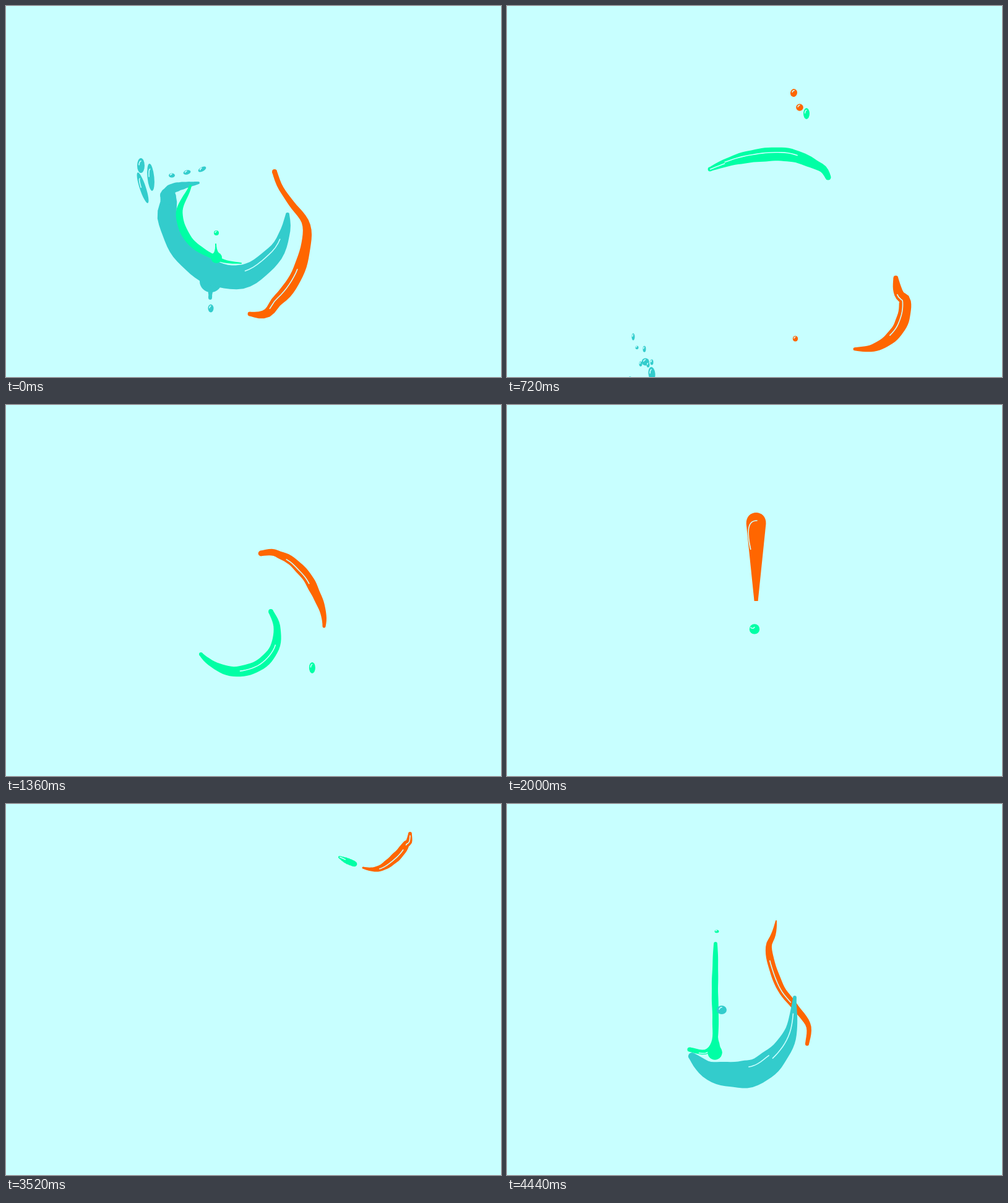
Animation of 800 by 600 pixels, one loop 4.48 s. Source, as an HTML page with a canvas:

```html
<!DOCTYPE html>
<html lang="en">
<head>
<meta charset="utf-8">
<title>Liquid exclamation</title>
<style>
html, body { margin: 0; width: 100%; height: 100%; overflow: hidden; background: #c8ffff; }
canvas { display: block; width: 800px; height: 600px; }
</style>
</head>
<body>
<canvas id="stage" width="800" height="600"></canvas>
<script>
const ctx = document.getElementById('stage').getContext('2d');
const PALE = '#c8ffff', TEAL = '#33cccc', GREEN = '#00ffa5', ORANGE = '#ff6600';
const LOOP = 4480, STEP = 80, GRAVITY = 0.001225, SAMPLES = 40, SUB = 16;
const lerp = (a, b, k) => a + (b - a) * k;
const inside = (t, from, to) => t >= from && t < to;
const easeIn = k => k ** 1.5;
const easeOut = k => 1 - (1 - k) ** 2;

let seed = 7;
const random = () => (seed = seed * 16807 % 2147483647) / 2147483647;

// Points along part of an ellipse, angles in degrees, clockwise.
function arc(cx, cy, rx, ry, from, to) {
  const n = Math.ceil((to - from) / 40);
  return Array.from({ length: n + 1 }, (_, i) => {
    const a = lerp(from, to, i / n) * Math.PI / 180;
    return [cx + rx * Math.cos(a), cy + ry * Math.sin(a)];
  });
}

// Smooth curve through all points, addressed by arc length.
function makeGuide(p) {
  const pick = i => p[Math.max(0, Math.min(p.length - 1, i))];
  const pts = [], len = [];
  for (let j = 0; j <= (p.length - 1) * SUB; j++) {
    const i = Math.floor(j / SUB), u = (j % SUB) / SUB;
    const a = pick(i - 1), b = pick(i), c = pick(i + 1), d = pick(i + 2);
    const pt = [0, 1].map(k => b[k] + 0.5 * u * (c[k] - a[k] +
      u * (2 * a[k] - 5 * b[k] + 4 * c[k] - d[k] + u * (3 * (b[k] - c[k]) + d[k] - a[k]))));
    len.push(j ? len[j - 1] + Math.hypot(pt[0] - pts[j - 1][0], pt[1] - pts[j - 1][1]) : 0);
    pts.push(pt);
  }
  return {
    lengthAt: index => len[index * SUB],
    point(s) {
      let i = len.findIndex(l => l > s);
      if (i < 0) i = len.length - 1;
      i = Math.max(i, 1);
      const k = (s - len[i - 1]) / (len[i] - len[i - 1] || 1);
      return [0, 1].map(n => lerp(pts[i - 1][n], pts[i][n], k));
    }
  };
}

// A stream of paint slides from pose to pose along one guide.
// Pose: time, spine (tail first), width [tail, belly, head, place of the belly],
// shine lines [from, to, offset], detour on the way to the next pose, easing.
const pose = (t, spine, width, shine = [], via = [], ease = k => k) => ({ t, spine, width, shine, via, ease });

function stream(color, from, to, ...poses) {
  const points = [];
  for (const p of poses) {
    p.first = points.length;
    points.push(...p.spine);
    p.last = points.length - 1;
    points.push(...p.via);
  }
  const guide = makeGuide(points);
  for (const p of poses) {
    p.tail = guide.lengthAt(p.first);
    p.head = guide.lengthAt(p.last);
  }
  return { color, from, to, guide, poses };
}

const streams = [
  // pouring in
  stream(ORANGE, -440, 0,
    pose(-440, [[448, -200], [450, 15]], [1, 4, 4, .5]),
    pose(-40, [[435, 189], [423, 235], [440, 293], [464, 326], [487, 358], [485, 388]], [1, 4.5, 3, .4], [[.3, .66, .2]])),
  stream(GREEN, -440, 0,
    pose(-440, [[337, -180], [337, 10]], [1, 3, 4, .6]),
    pose(-40, [[337, 226], [336, 300], [337, 350], [335, 385], [321, 401], [295, 397]], [3, 2, 3.5, .4], [[.75, .93, -.5]])),
  stream(GREEN, -40, 0, pose(-40, [[336, 402], [340, 345]], [12, -4, 1, .5])),
  stream(TEAL, -440, 0,
    pose(-440, [[480, -200], [478, 5]], [2, 6, 5, .6], [], [[474, 110], [470, 230]]),
    pose(-40, [[465, 313], [458, 370], [435, 408], [400, 434], [360, 437], [325, 430], [299, 408]], [3, 17, 6, .6],
      [[.1, .42, .1], [.42, .6, .5]])),

  // splash and swirl
  stream(ORANGE, 0, 2000,
    pose(0, [[434, 268], [443, 292], [461, 319], [484, 350], [485, 385], [470, 435], [440, 475], [394, 498]],
      [4, 6.5, 3.5, .7], [[.6, .87, .3]], arc(395, 270, 230, 245, 140, 350)),
    pose(720, arc(572, 484, 71.5, 71.5, -38, 98), [4, 7, 2.5, .45], [[.15, .62, .4]], arc(400, 400, 165, 155, 70, 235)),
    pose(1360, [[412, 240], [446, 244], [470, 260], [495, 293], [514, 358]], [4.5, 4.5, 2.5, .55], [[.25, .58, .35]],
      [...arc(412, 370, 92, 105, 45, 180), [352, 215], [380, 172]], easeOut),
    pose(2000, [[403, 190], [403, 313]], [15, 1, 3.5, .3])),
  stream(TEAL, 0, 80, pose(0, [[258, 306], [272, 294], [311, 286]], [9, 1, 2, .4])),
  stream(TEAL, 0, 80, pose(0, [[331, 445], [330, 472]], [18, -5, 3, .5])),
  stream(TEAL, 0, 640,
    pose(0, [[455, 337], [451, 365], [433, 402], [385, 437], [330, 430], [286, 395], [261, 345], [262, 308]],
      [3, 12, 13, .45], [[.12, .37, .4]], [[240, 250], [200, 220], [172, 280]]),
    pose(640, [[178, 500], [190, 660]], [1, 5, 1, .6])),
  stream(GREEN, 0, 80, pose(0, [[340, 407], [339, 385]], [9, -2.5, 1, .5])),
  stream(GREEN, 0, 1760,
    pose(0, [[380, 416], [345, 410], [298, 381], [280, 335], [298, 291]], [1, 4.5, 2, .55], [],
      arc(408, 340, 140, 135, 225, 560)),
    pose(720, [[328, 264], [385, 245], [450, 240], [497, 256], [519, 277]], [3.5, 7, 4.5, .5],
      [[.12, .7, -.25], [0, .13, .1]],
      [...arc(420, 375, 120, 110, -10, 170), ...arc(372, 355, 64, 60, 190, 310)]),
    pose(1360, [[428, 334], [438, 360], [433, 395], [405, 423], [360, 430], [315, 403]], [4, 5.5, 3, .55],
      [[.28, .66, .05]], arc(358, 330, 64, 66, 160, 380)),
    pose(1760, [[405, 372], [398, 388]], [6, 2, 8, .5])),

  // flying off
  stream(GREEN, 3120, 3840,
    pose(3040, [[402, 376], [402, 350]], [10, 2, 13, .5], [], [[402, 202], [408, 120], [440, 62], [490, 58]], easeIn),
    pose(3520, [[539, 86], [563, 97]], [2, 1.5, 4.5, .5], [[0, .4, -.2]], [[577, 104], [604, 104], [632, 84], [652, 50]]),
    pose(3800, [[655, -40], [655, -70]], [2, 2, 4, .5])),
  stream(ORANGE, 3120, 3840,
    pose(3040, [[402, 318], [402, 202]], [3, 0, 12, .5], [], [[408, 120], [440, 62], [490, 58], [540, 86]], easeIn),
    pose(3520, [[577, 103], [604, 104], [630, 86], [646, 66], [653, 48]], [1.5, 5, 3, .55], [[.25, .72, .15], [.8, .97, .1]]),
    pose(3760, [[655, -60], [655, -260]], [1.5, 3, 3, .5]))
];

function widthAt([tail, belly, head, place], u) {
  const power = Math.log(.5) / Math.log(place);
  return lerp(tail, head, u) + belly * Math.sin(Math.PI * u ** power);
}

function drawStream({ color, guide, poses }, t) {
  const next = poses.findIndex(p => p.t > t);
  const a = poses[next < 0 ? poses.length - 1 : next - 1] || poses[0];
  const b = poses[next] || a;
  const k = a === b ? 0 : a.ease((t - a.t) / (b.t - a.t));
  const nodes = [];
  for (let n = 0; n <= SAMPLES; n++) {
    const u = n / SAMPLES;
    const s = lerp(lerp(a.tail, b.tail, k), lerp(a.head, b.head, k), u);
    const [x, y] = guide.point(s), p = guide.point(s - 1.5), q = guide.point(s + 1.5);
    const dx = q[0] - p[0], dy = q[1] - p[1], m = Math.hypot(dx, dy) || 1;
    const wobble = 1 + .03 * Math.sin(n * .9 + t * .05);
    nodes.push({ x, y, nx: -dy / m, ny: dx / m, w: wobble * lerp(widthAt(a.width, u), widthAt(b.width, u), k) });
  }
  const trace = (list, side) => list.forEach(o => ctx.lineTo(o.x + o.nx * o.w * side, o.y + o.ny * o.w * side));
  ctx.fillStyle = color;
  ctx.beginPath();
  trace(nodes, 1);
  trace([...nodes].reverse(), -1);
  ctx.fill();
  for (const o of [nodes[0], nodes[SAMPLES]]) disc(o.x, o.y, o.w);
  pen();
  for (const [from, to, offset] of a.shine) {
    ctx.beginPath();
    trace(nodes.slice(Math.round(from * SAMPLES), Math.round(to * SAMPLES) + 1), offset);
    ctx.stroke();
  }
}

function disc(x, y, r) {
  ctx.beginPath();
  ctx.arc(x, y, Math.max(r, 0), 0, 7);
  ctx.fill();
}

function pen() {
  ctx.strokeStyle = PALE;
  ctx.lineWidth = 1.6;
}

const drops = [];
// Free fall through (x, y) at time t0.
function drop(color, x, y, rx, ry, t0, from, to, { vx = 0, vy = 0, turn = 0, shrink = 0 } = {}) {
  drops.push({ color, x, y, rx, ry, t0, from, to, vx, vy, turn, shrink });
}

drop(TEAL, 347, 333, 8, 7, -40, -120, 0, { vy: .1 });
drop(GREEN, 339, 206, 3.5, 2.5, -40, -120, 0, { vy: .3 });
drop(TEAL, 331, 489, 4.5, 6.5, 0, 0, 240, { vy: .3 });
drop(GREEN, 340, 367, 4, 4, 0, 0, 320);
drop(TEAL, 218, 258, 6, 12, 0, 0, 880, { vx: .008, shrink: .0007 });
drop(TEAL, 234, 277, 5.5, 22, 0, 0, 880, { turn: -.1, shrink: .0007 });
drop(TEAL, 221, 294, 5, 26, 0, 0, 880, { vx: -.026, turn: -.32, shrink: .0007 });
for (let i = 0; i < 3; i++) drop(TEAL, 268 + 24.5 * i, 274 - 5 * i, 5 + i, 3.5, 0, 0, 320, { vx: -.08, turn: -.25 * i });
for (let i = 0; i < 6; i++) {
  drop(TEAL, 204 + 6 * i, 535 + 60 * random(), 2.5, 2 + 4 * random(), 720, 480, 880, { vy: .88 });
  drop(i % 2 ? ORANGE : TEAL, 440 + 9 * i, 330 - 12 * i, 4, 5, 80, 80, 560, { vx: .25 + .12 * i, vy: -.25 - .1 * i });
}
drop(ORANGE, 463.5, 140.5, 5.5, 6.5, 720, 480, 1040, { turn: .2 });
drop(ORANGE, 473, 164, 5.8, 5.8, 720, 480, 1040);
drop(GREEN, 484, 174, 5, 9, 720, 480, 1600, { vx: .017 });
drop(ORANGE, 466, 538, 4.2, 4.5, 720, 640, 880, { vy: .3 });

function drawDrop(d, t) {
  const dt = t - d.t0, ry = d.ry * (1 - d.shrink * dt);
  ctx.save();
  ctx.translate(d.x + d.vx * dt, d.y + d.vy * dt + GRAVITY * dt * dt / 2);
  ctx.rotate(d.turn);
  ctx.fillStyle = d.color;
  ctx.beginPath();
  ctx.ellipse(0, 0, d.rx, ry, 0, 0, 7);
  ctx.fill();
  pen();
  ctx.beginPath();
  ctx.ellipse(0, 0, d.rx * .5, ry * .6, 0, 3.2, 4.9);
  ctx.stroke();
  ctx.restore();
}

// The exclamation mark swells, then settles into its clean shape.
function drawMark(t) {
  const k = Math.min((t - 2000) / 640, 1);
  const swell = (1 - k) * (1 + 2.4 * Math.sin(Math.PI * k));
  const x = 402.6, top = 188 - 14 * swell, w = 12.2 + 3.7 * swell, foot = 319 - 2 * (1 - k);
  ctx.fillStyle = ORANGE;
  ctx.beginPath();
  ctx.moveTo(x - 3, foot);
  ctx.lineTo(x - w, top + 18);
  ctx.bezierCurveTo(x - w * 1.06, top - 6, x + w * 1.06, top - 6, x + w, top + 18);
  ctx.lineTo(x + 3, foot);
  ctx.fill();
  if (k === 1) return;
  pen();
  ctx.beginPath();
  ctx.moveTo(x + 2, top + 13);
  ctx.bezierCurveTo(x - w, top + 12, x - w * .9, top + 35, x - w * .55, top + 60);
  ctx.stroke();
}

function drawDot(t) {
  const bounce = Math.max(0, 1 - (t - 1760) / 240) ** 2;
  const grow = easeOut(Math.max(0, Math.min((t - 2000) / 400, 1)));
  const x = 400 + 2.4 * grow, y = 362.4 + 26 * bounce - 1.4 * grow, r = lerp(8.2, 15, grow);
  ctx.fillStyle = GREEN;
  disc(x, y, r);
  if (grow === 1) return;
  pen();
  ctx.beginPath();
  ctx.arc(x - r * .4, y - r * .6, r * .45, .4, 2.6);
  ctx.stroke();
}

// Drawn on steps, with two holds; the pour-in counts up to zero.
function stepTime(t) {
  if (t >= 4040) return Math.floor((t - 4040) / STEP) * STEP - 440;
  if (inside(t, 2640, 3120)) return 2640;
  return Math.min(Math.floor(t / STEP) * STEP, 3840);
}

function draw(t) {
  ctx.fillStyle = PALE;
  ctx.fillRect(0, 0, 800, 600);
  for (const s of streams) if (inside(t, s.from, s.to)) drawStream(s, t);
  for (const d of drops) if (inside(t, d.from, d.to)) drawDrop(d, t);
  if (inside(t, 1760, 3120)) drawDot(t);
  if (inside(t, 2000, 3120)) drawMark(t);
}

const start = performance.now();
function tick() {
  draw(stepTime((performance.now() - start) % LOOP));
  requestAnimationFrame(tick);
}
tick();
</script>
</body>
</html>
```
